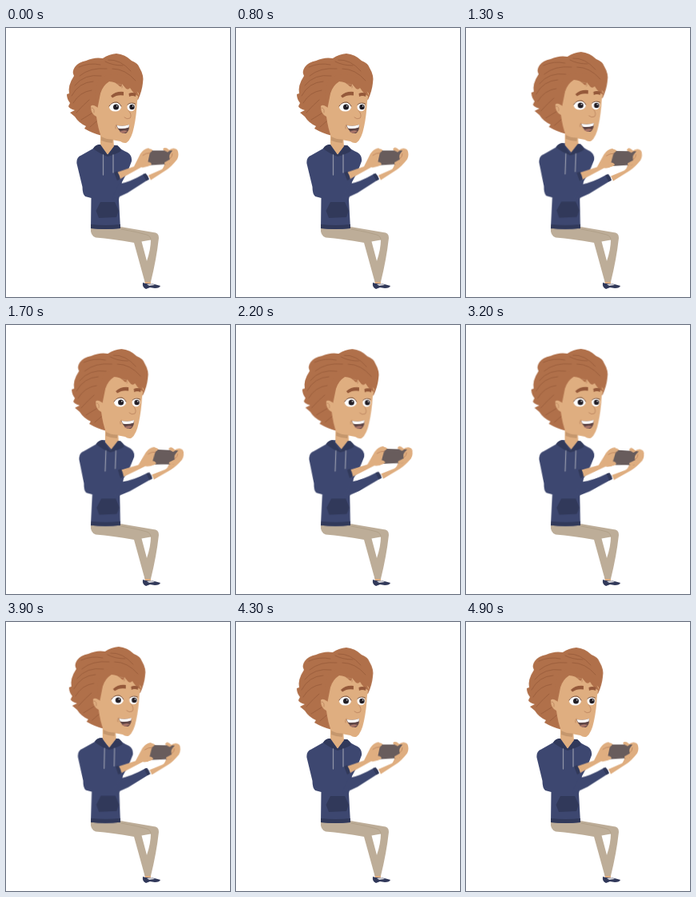
An HTML page for the animation above (5 s loop, 280x337 px).

```html
<!DOCTYPE html>
<html lang="en">
<head>
<meta charset="utf-8">
<title>Filming with a phone</title>
<style>
  html, body { margin: 0; width: 100%; height: 100%; overflow: hidden; background: #fff; }
  svg { display: block; width: 100vw; height: 100vh; }
  .torso, .head, .arms { animation: 5s ease-in-out infinite; }
  .torso { transform-origin: 125px 250px; animation-name: lean; }
  .head { transform-origin: 128px 142px; animation-name: head; }
  .arms { transform-origin: 138px 190px; animation-name: arms; }

  @keyframes lean {
    0%, 16%, 84%, 100% { transform: skewX(0deg) scaleY(1); }
    27%, 72% { transform: skewX(-2.1deg) scaleY(1.016); }
  }
  @keyframes head {
    0%, 16%, 84%, 100% { transform: translate(0, 0) rotate(0deg); }
    6%, 92% { transform: translate(-.4px, .2px) rotate(-.2deg); }
    27% { transform: translate(5.7px, -2.1px) rotate(.1deg); }
    44% { transform: translate(6.3px, -2px) rotate(.6deg); }
    58%, 72% { transform: translate(5.5px, -2.2px) rotate(.1deg); }
  }
  @keyframes arms {
    0%, 16%, 84%, 100% { transform: translate(0, .5px) rotate(0deg); }
    26% { transform: translate(.8px, 2px) rotate(.8deg); }
    36% { transform: translate(2px, 2.4px) rotate(3deg); }
    44% { transform: translate(1px, 2.2px) rotate(1.8deg); }
    52% { transform: translate(.6px, 2px) rotate(1.4deg); }
    65% { transform: translate(2px, 2.4px) rotate(3.6deg); }
    78% { transform: translate(.3px, 1.2px) rotate(1deg); }
  }

  .skin { fill: #dfae80; }
  .hair { fill: #b0704a; }
  .navy { fill: #3d4770; }
  .dark { fill: #31395a; }
  .pants { fill: #bdad98; }
  .line { fill: none; stroke-linecap: round; stroke-linejoin: round; }
  .strand { stroke: #9c5f3d; stroke-width: 1; }
  .crease { stroke: #bd8660; stroke-width: .9; }
  .fold { stroke: #333c60; stroke-width: .8; }
  .cord { stroke: #8f93a6; stroke-width: 1.3; }
</style>
</head>
<body>
<svg viewBox="0 0 280 337" preserveAspectRatio="none">
  <g class="legs">
    <path class="skin" d="M173 314 L181 314 L181 321 L174 322Z"/>
    <path class="dark" d="M171 319 Q176 321 181 320 Q186 321 193 323 Q192 326 186 326 L180 325 L175 327 Q170 325 171 319Z"/>
    <path d="M176 321 L182 320 L186 322 L179 323Z" fill="#d3d2d6"/>
    <path class="pants" fill-rule="evenodd" d="M106 250 L143 249 L184 256 Q191 256 191 263 Q188 290 181 318 L173.500 318 L160 269 Q133 264 112 262.500 Q105 260 106 250Z M169.500 267.500 L176 292 Q181 277 181 265.500Z"/>
    <path class="line" d="M144 252 Q162 255 176 259 Q181 261 181 265" stroke="#ad9c85" stroke-width=".8"/>
  </g>

  <g class="torso">
    <path class="navy" d="M109 151 Q112 146 120 146 L138 147 Q143 152 152 156 Q158 160 157 167 L152 180 L145 193 L141 215 L143 251 Q124 253 106 251 L106.500 213 L99 211 Q95.500 208 95.500 199 L88.500 170 Q87.500 162 94 159.500Z"/>
    <path class="dark" d="M106 246 Q125 248 143 246 L143 251 Q124 253 106 251Z"/>
    <path class="dark" d="M118 218 L136 218 L141 229 L138 237 L116 238 L112.500 229Z"/>
  </g>

  <g class="head">
    <path class="hair" d="M120 135 Q108 132 98 126 L100 123 Q91 119 86 111 L80 106 L86 103 Q79 101 78 98 L80 94 Q76 89 76 83 L79 82 Q77 72 85 60 Q82 55 86 49 Q90 43 100 41 Q111 36 121 38 Q128 33 138 32 Q149 33 157 41 Q165 44 167 50 Q173 60 171 69 Q170 79 165 90 L158 86 L130 84 L116 105Z"/>
    <path class="skin" d="M118 112 L118 149 L127 159 L135 149 L134 135Z"/>
    <path class="skin" d="M113.500 99 Q108 95 106 98 Q106 108 113 111 Q115 126 119 136 Q130 140 143 142 Q147 145 151 143.500 Q157 139 160 124 Q163 110 164 92 L166 82 Q159 74 152 72 Q144 62 132 64 Q122 67 118 80Z"/>
    <path d="M119 136 Q126 140 133.500 139.500 L133 144 Q126 144 119 141Z" fill="#c5976d"/>
    <path class="hair" d="M113 98 Q108 80 116 64 Q130 54 147 60 Q160 65 166 86 Q160 83 155 75 Q153 78 150 76 L145 70 Q145 75 142 73 Q137 67 129 67 Q121 72 118 82 L114.500 100Z"/>
    <g class="line strand">
      <path d="M91 49 Q104 43 118 46 M92 60 Q105 49 126 51 M86 72 Q98 57 119 60 M82 85 Q91 68 109 67"/>
      <path d="M84 94 Q92 80 107 78 M88 106 Q97 96 104 90 M94 115 L107 107 M105 124 L113 117"/>
      <path d="M128 40 Q143 39 156 54 M133 51 Q149 51 162 66 M124 42 Q133 47 146 47"/>
    </g>
    <path class="line crease" d="M107 100 Q111 100 110 106 M153 103 Q158 109 155 113 Q151 115 148 112 M138 121 Q136 123 137 126 M139 70 Q147 70 145 75"/>
    <g fill="#95593a">
      <path d="M131 85 Q137 79 147 80 L147 84.500 Q139 83 133 87.500Z"/>
      <path d="M153.500 82 Q158 80 162.500 82 L162 86 Q158 84 154 86Z"/>
    </g>
    <g fill="#fff">
      <ellipse cx="136.500" cy="99" rx="7.500" ry="5.500"/>
      <ellipse cx="156.500" cy="99" rx="5" ry="5.300"/>
    </g>
    <g fill="#211d24">
      <circle cx="137.500" cy="99" r="3.500"/>
      <circle cx="157.500" cy="99" r="3.200"/>
    </g>
    <g fill="#fff">
      <circle cx="138.700" cy="97.700" r=".8"/>
      <circle cx="158.600" cy="97.700" r=".8"/>
    </g>
    <path class="line" d="M129 98 Q132 92.500 139 93 Q143 95 144 98 M152 96 Q156 92.500 161.500 95" stroke="#6b4632" stroke-width=".9"/>
    <path d="M138 122 Q147 124 154 121 Q155 128 150 132 Q142 133 138 122Z" fill="#5f4545"/>
    <path d="M138.500 122 Q147 124 154 121 L153.500 124.500 Q146 127 140 125.500Z" fill="#fff"/>
    <path d="M142 130 Q147 127 152 129 Q147 134 142 130Z" fill="#a87468"/>
  </g>

  <g class="torso">
    <path class="navy" d="M109 152 Q111 146 118 146 L127 159 L136 147 L139 147 Q144 151 145 155 Q138 163 127 161 Q116 161 109 152Z"/>
    <path class="dark" d="M109 151 Q112 146 117.500 146 L127 159 L136 147 L139 147 Q143 150 144 154 Q138 158 127 161 Q116 157 109 151Z"/>
    <path class="line cord" d="M121.500 159 L121.500 184 M134 159 L134 181"/>
    <g class="arms">
      <path class="skin" d="M178 184 L194 177 Q199 174 198 164 L203 153 Q209 148 214 152 Q217 158 214 164 Q207 173 201 177 L181 190Z"/>
      <path class="navy" d="M141 195 Q154 193 173 182 L178.500 189 L152 206 Q143 211 132 214Z"/>
      <path class="dark" d="M171 183 L174.500 181.500 Q178 185 179 189 L175.500 191Z"/>
      <path class="skin" d="M137 181 L160 173 L168 157 Q172 151 178 150 L184 153 L180 171 Q175 175 169 174 L142 189Z"/>
      <path class="dark" d="M135 180.500 L139 179 Q142 184 143 188.500 L139 190.500Z"/>
      <path d="M182 153 L208 153 Q210 153 209 155 L205 169 Q205 170 203 170 L179 171.500 Q176 171 177 169 L180 155Z" fill="#685c5c"/>
      <path class="skin" d="M170 155 Q176 149 183 152 Q183 155 177 157 L172 160Z"/>
      <path class="skin" d="M175 167 Q181 167 182 170 Q180 173 174 173Z"/>
      <path class="skin" d="M196 152 Q197 148 201 150 L205 153 L202 155Z"/>
      <path class="skin" d="M209 152 Q216 151 215 158 Q212 166 204 170 Q198 172 198 168 L205 164 Q203 159 206 156Z"/>
      <path class="line crease" d="M171 159 Q175 156 180 156 M205 163 Q208 161 208 157"/>
    </g>
  </g>
</svg>
</body>
</html>
```
